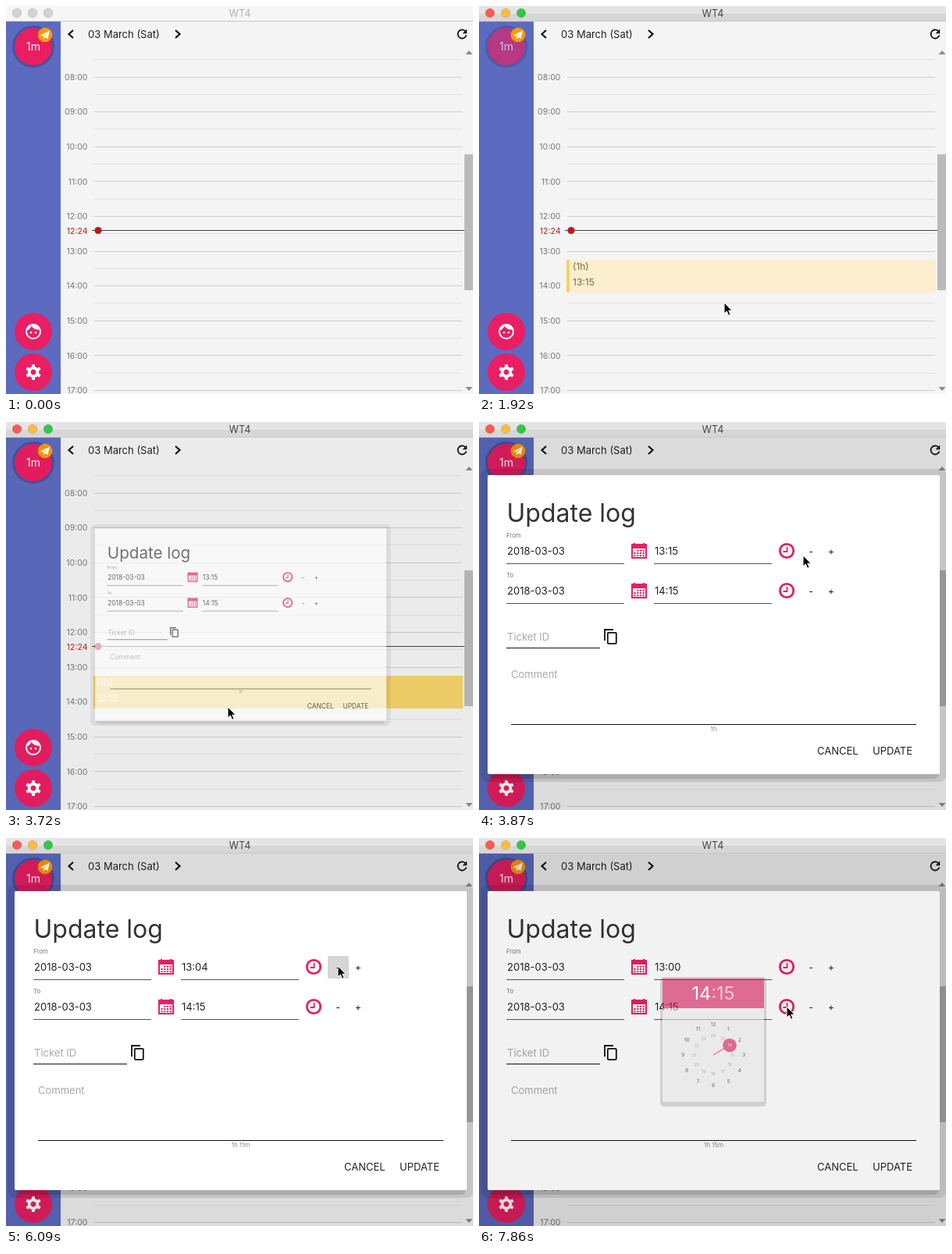
Write an HTML page that moves like this. It is 598 px wide and 497 px high and loops after 8 s.

```html
<!DOCTYPE html>
<html lang="en">
<head>
<meta charset="utf-8">
<title>Work log calendar</title>
<style>
  html, body { margin: 0; width: 100%; height: 100%; overflow: hidden; background: #f4f4f4; }
  svg { display: block; width: 100%; height: 100%; }
  text { font-family: Inter, Roboto, sans-serif; }
</style>
</head>
<body>
<svg id="stage" viewBox="0 0 598 497" xmlns="http://www.w3.org/2000/svg"></svg>
<script>
const PINK = '#e91e63', INK = '#222';
const BEAT = 148.3, LOOP = 8000;

// Markup helpers
const rect = (x, y, w, h, fill, extra = '') =>
  `<rect x="${x}" y="${y}" width="${w}" height="${h}" fill="${fill}" ${extra}/>`;
const circle = (x, y, r, fill, extra = '') =>
  `<circle cx="${x}" cy="${y}" r="${r}" fill="${fill}" ${extra}/>`;
const text = (x, y, size, fill, str, extra = '') =>
  `<text x="${x}" y="${y}" font-size="${size}" fill="${fill}" ${extra}>${str}</text>`;
const stroke = (d, color, width, extra = '') =>
  `<path d="${d}" fill="none" stroke="${color}" stroke-width="${width}" ${extra}/>`;
const fill = (d, color) => `<path d="${d}" fill="${color}"/>`;
const at = (x, y, body) => `<g transform="translate(${x} ${y})">${body}</g>`;
const group = (id, body) => `<g id="${id}">${body}</g>`;
const list = (n, make) => Array.from({ length: n }, (_, i) => make(i)).join('');
const MIDDLE = 'text-anchor="middle"', END = 'text-anchor="end"';

// Icons, drawn around their own centre
const gear = list(6, i => rect(-2, -10, 4, 6, '#fff', `rx=".8" transform="rotate(${i * 60})"`)) +
  circle(0, 0, 5.4, 'none', 'stroke="#fff" stroke-width="3.8"');
const face = circle(0, 0, 9, 'none', 'stroke="#fff" stroke-width="2"') +
  fill('M-9 -1Q-4 -3 -2.6 -7Q1.5 -1.5 8.6 -2.4L6 -8Q0 -11 -6 -8Z', '#fff') +
  circle(-3, 1.2, 1.3, '#fff') + circle(3, 1.2, 1.3, '#fff');
const plane = fill('M-6 .5L6 -5.5L3.5 5L0 3L-2 5.5V2L3.5 -3L-3 1.8Z', '#fff');
const refresh = stroke('M4 -3.9A5.5 5.5 0 1 0 5.4 1.4', '#111', 1.8) + fill('M6.2 -6.5V-.8H.5Z', '#111');
const calendar = rect(-9, -8, 18, 17, 'none', `stroke="${PINK}" stroke-width="2"`) +
  rect(-10, -9, 20, 6, PINK) + rect(-7, -10, 2, 3, PINK) + rect(5, -10, 2, 3, PINK) +
  list(11, i => rect(-6.5 + (i + 1) % 4 * 3.7, -1.2 + Math.floor((i + 1) / 4) * 3.2, 2.2, 2, PINK));
const clockIcon = circle(0, 0, 8.7, 'none', `stroke="${PINK}" stroke-width="2.8"`) +
  stroke('M.5 -5V1H-4.5', PINK, 1.8);
const copyIcon = stroke('M-7 5V-9H4', '#111', 1.8) +
  rect(-3.2, -5.2, 11, 14, 'none', 'stroke="#111" stroke-width="1.8" rx="1"');
const updateIcon = stroke('M5.5 -4.2A7 7 0 1 0 7 1', '#111', 1.9) +
  fill('M8 -7.5V-1.5H2Z', '#111') + stroke('M0 -4V.5L3.5 2.5', '#111', 1.5);
const trashIcon = rect(-6, -8, 12, 2.2, '#111') + rect(-2.5, -9, 5, 2, '#111') +
  rect(-5, -4.8, 10, 13, '#111', 'rx="1.6"');
const peopleIcon = circle(-3, -3, 3, '#111') + circle(4.2, -1.6, 2.4, '#111') +
  fill('M-8.5 6V4Q-7 1.2 -3 1.2Q-.5 1.2 .5 2Q-1 3 -1 6Z', '#111') +
  fill('M.5 6V4.5Q1.5 2.2 4.2 2.2Q7.5 2.2 8.5 4.5V6Z', '#111');

function titleBar(id, top, bottom, buttons, ink) {
  return group(id, rect(0, 0, 598, 10, top) + rect(0, 10, 598, 9, bottom) + rect(0, 19, 598, 1, '#c8c8c8') +
    buttons.map((c, i) => circle(14 + 20 * i, 9, 5.8, c, 'stroke="#000" stroke-opacity=".12"')).join('') +
    text(299.5, 14, 12.6, ink, 'WT4', MIDDLE));
}

function sidebar() {
  const button = (y, icon) => circle(35, y, 24, PINK) + at(35, y, icon);
  return rect(0, 20, 70, 477, '#5c6bc0') +
    group('timer', circle(35, 52, 27, '#44549c') + circle(35, 52, 24, PINK) +
      text(35, 57, 14, '#fff', '1m', MIDDLE)) +
    circle(50, 37, 9.3, '#ff9800') + at(50, 37, plane) + button(417, face) + button(469, gear);
}

function agenda() {
  const lines = list(20, i =>
    rect(113, Math.floor(68.7 + 22.3 * i), 471, 1, i % 2 ? '#cdcdcd' : '#e2e2e2'));
  const hours = list(10, i =>
    text(104.5, 94.8 + 44.6 * i, 10.5, '#777', String(8 + i).padStart(2, '0') + ':00', END));
  return stroke('M86 31L80.5 36L86 41', '#111', 2.2) + stroke('M217 31L222.5 36L217 41', '#111', 2.2) +
    text(105, 41, 13, INK, '03 March (Sat)') + at(584, 36, refresh) + lines + hours +
    rect(587, 190, 11, 174, '#bababa') +
    fill('M588.5 62L593 57L597.5 62ZM588.5 488L593 493L597.5 488Z', '#8a8a8a') +
    text(104.5, 291.5, 10.5, '#b71c1c', '12:24', END) +
    rect(110, 287, 477, 1, '#444') + circle(118, 287.5, 4.6, '#b71c1c');
}

function entry(id, x, background, ink) {
  return group(id, rect(112, 325, 473, 42, background) + rect(112, 325, 4, 42, '#f8d166') +
    text(x, 338, 12, ink, '(1h)') + text(x, 358, 12, ink, '13:15'));
}

function menu() {
  const item = (y, icon, label) => at(234, y, icon) + text(247, y + 5, 13, INK, label);
  return group('menu', rect(213, 349, 99, 98, '#000', 'opacity=".07" rx="7"') +
    rect(221, 360, 84, 82, '#000', 'opacity=".14" rx="3"') +
    rect(218.5, 346.5, 88, 90, '#f9f9f9', 'stroke="#bbb"') +
    item(364, updateIcon, 'Update') + item(391, trashIcon, 'Delete') + item(418, peopleIcon, 'Clone'));
}

function dialog() {
  const row = (y, label, time, id) =>
    text(35, y - 17, 7.8, '#777', label) + text(36, y + 5, 13, INK, '2018-03-03') +
    rect(35, y + 16, 151, 1, '#555') + at(205, y, calendar) +
    text(225, y + 5, 13, INK, time, `id="${id}"`) + rect(224, y + 16, 151, 1, '#555') +
    at(394, y, clockIcon) + text(425, y + 5, 12.5, INK, '-', MIDDLE) + text(451, y + 5, 12.5, INK, '+', MIDDLE);
  return group('dialog', rect(2, 60, 597, 401, '#000', 'opacity=".1" rx="10"') +
    rect(13, 80, 575, 377, '#000', 'opacity=".13" rx="5"') +
    rect(11, 68, 579, 383, '#fff', 'rx="2"') +
    text(35.5, 128, 32, '#333', 'Update log') +
    group('hover', rect(412, 151, 27, 29, '#d6d6d6', 'rx="2"')) +
    row(165, 'From', '13:15', 'from') + row(216, 'To', '14:15', 'to') +
    text(36, 280, 13, '#aaa', 'Ticket ID') + rect(35, 289, 120, 1, '#111') + at(168, 275, copyIcon) +
    text(41, 328, 13, '#aaa', 'Comment') + rect(41, 387, 519, 1, '#111') +
    text(300.5, 396, 8, '#888', '1h', `id="duration" ${MIDDLE}`) +
    text(433, 426, 13, INK, 'CANCEL') + text(504, 426, 13, INK, 'UPDATE'));
}

function picker() {
  const ring = (radius, size, color, label) => list(12, i => {
    const a = i * Math.PI / 6;
    return text(300 + radius * Math.sin(a), 278 + size * .36 - radius * Math.cos(a), size, color, label(i), MIDDLE);
  });
  return group('picker', rect(232, 178, 136, 166, '#000', 'opacity=".14" rx="5"') +
    `<g opacity=".56">${rect(235, 180, 130, 158, '#fff')}${rect(235, 180, 130, 38, PINK)}` +
    stroke('M300 278L321 265', PINK, 1.2) +
    ring(39, 6.8, '#222', i => i || 12) + ring(24.5, 5, '#888', i => i ? 12 + i : '00') +
    circle(321, 265.5, 8.8, PINK) + text(321, 267.3, 5, '#fff', '14', MIDDLE) + '</g>' +
    text(300, 207, 23.5, '#fff', '14<tspan fill-opacity=".65">:15</tspan>', MIDDLE));
}

const cursorShape = '<path d="M0 0V14L3.3 11L5.6 16.3L8 15.2L5.7 10.2H10Z" fill="#000" stroke="#fff" stroke-linejoin="round"/>';

document.getElementById('stage').innerHTML =
  rect(0, 0, 598, 497, '#f4f4f4') + sidebar() + agenda() +
  entry('preview', 120, '#fcefcf', '#786a44') + entry('saved', 116, '#f6d36b', '#fff') + menu() +
  rect(0, 20, 598, 477, '#000', 'id="shade"') + dialog() +
  rect(0, 20, 598, 477, '#000', 'id="pickerShade" opacity=".05"') + picker() +
  titleBar('inactive', '#f6f6f6', '#f6f6f6', ['#d2d2d2', '#d2d2d2', '#d2d2d2'], '#b0b0b0') +
  titleBar('active', '#e4e4e4', '#d6d6d6', ['#fc5b57', '#fdbc40', '#33c748'], '#444') +
  group('cursor', cursorShape);

const $ = id => document.getElementById(id);
const show = (id, visible) => $(id).setAttribute('display', visible ? 'inline' : 'none');
const set = (id, name, value) => $(id).setAttribute(name, value);

// Pointer stops: beat, x, y
const path = [
  [2, 228, 325], [7, 84, 287], [9, 42, 64], [10, 36, 54], [11, 150, 190], [12, 270, 345],
  [13, 314, 380], [16, 300, 362], [18, 270, 352], [20, 221, 347], [22, 221, 347], [24, 275, 364],
  [25, 284, 365], [26, 415, 171], [28, 425, 164], [48, 425, 164], [51, 394, 216], [54, 394, 216]
];

function pointer(beat) {
  const next = Math.max(1, path.findIndex(p => p[0] >= beat));
  const [a, b] = [path[next - 1], path[next]];
  const k = (beat - a[0]) / (b[0] - a[0]);
  return [a[1] + (b[1] - a[1]) * k, a[2] + (b[2] - a[2]) * k];
}

function render(time) {
  const beat = Math.min(53, Math.floor((time + 9) / BEAT));
  const opening = beat === 25;
  const minute = Math.max(0, Math.min(15, 45 - beat));

  show('inactive', beat < 9);
  show('active', beat >= 9);
  set('timer', 'opacity', beat >= 10 && beat < 18 ? .65 : 1);
  show('preview', beat >= 12 && beat < 18);
  show('saved', beat >= 18);
  show('menu', beat >= 21 && beat < 25);

  show('dialog', beat >= 25);
  set('shade', 'opacity', beat < 25 ? 0 : opening ? .037 : .1);
  set('dialog', 'opacity', opening ? .65 : 1);
  set('dialog', 'transform', `translate(300.5 259.5) scale(${opening ? .644 : 1}) translate(-300.5 -259.5)`);
  show('hover', beat >= 28 && beat < 49);
  $('from').textContent = '13:' + String(minute).padStart(2, '0');
  $('duration').textContent = minute < 15 ? `1h ${15 - minute}m` : '1h';

  show('pickerShade', beat >= 53);
  show('picker', beat >= 53);
  show('cursor', beat >= 2);
  if (beat >= 2) set('cursor', 'transform', `translate(${pointer(beat)})`);
}

function tick() {
  render(performance.now() % LOOP);
  requestAnimationFrame(tick);
}
tick();
</script>
</body>
</html>
```
